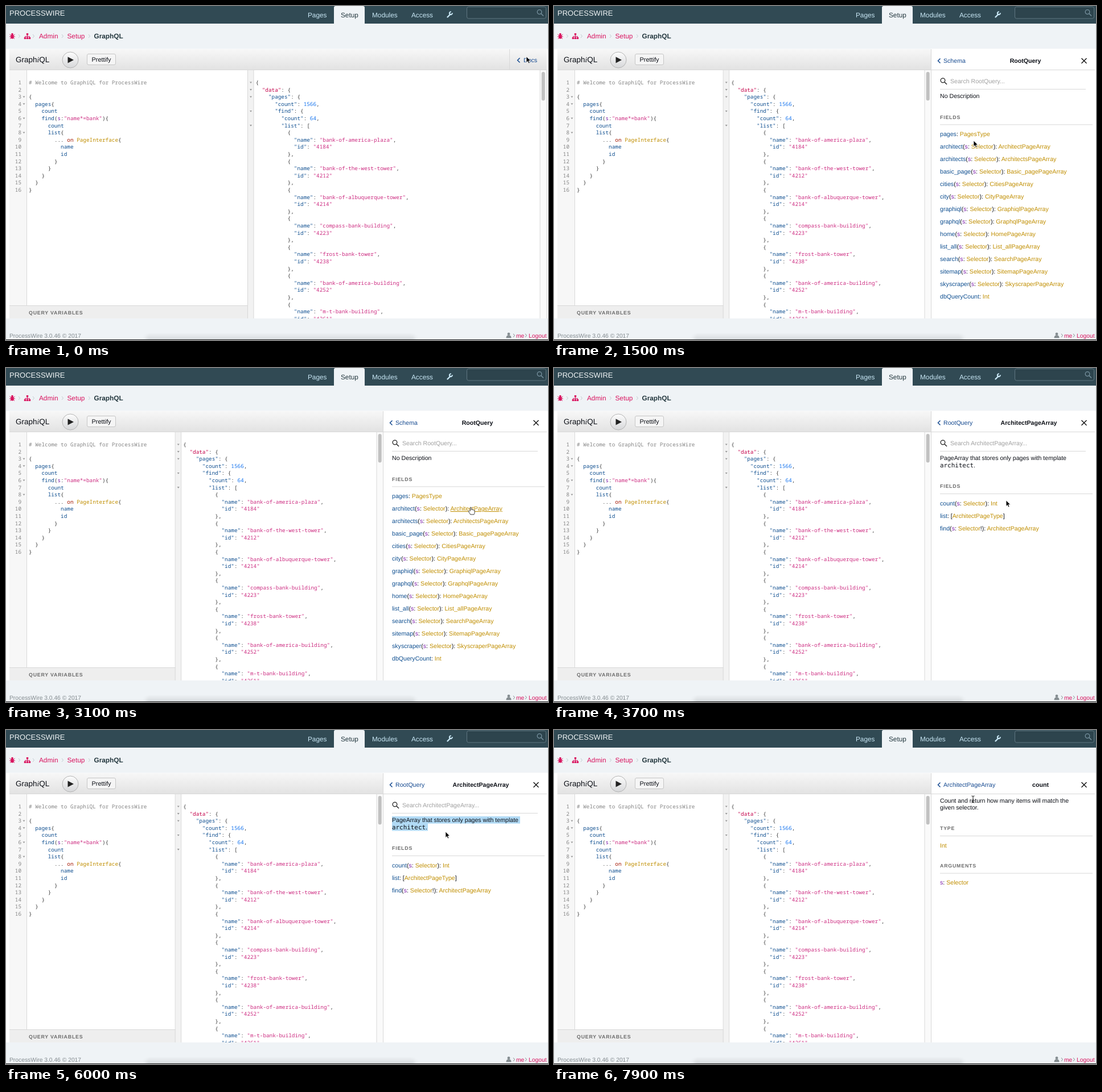
Recreate the animation shown at these times as an HTML page. Size 952x588 px, loop 8000 ms.

```html
<!DOCTYPE html>
<html lang="en">
<head>
<meta charset="utf-8">
<title>GraphiQL docs</title>
<style>
html, body { margin: 0; width: 100%; height: 100%; overflow: hidden; background: #fff; }
svg { display: block; width: 952px; height: 588px; }
text { white-space: pre; font: 10.6px "Liberation Sans", Arial, sans-serif; fill: #0c0f16; text-rendering: geometricPrecision; }
.code { font: 9.35px "Noto Sans Mono", "DejaVu Sans Mono", monospace; }
.nav { font-size: 11.8px; fill: #c9e7f5; }
.crumb { font-size: 11.8px; }
.foot { font-size: 10.3px; fill: #858d91; }
.pink { fill: #d9145f; }
.dark { fill: #22363d; }
.bold { font-weight: bold; }
.caps { font-size: 8.8px; font-weight: bold; letter-spacing: .8px; fill: #6c6c6c; }
.gray, .comment { fill: #868686; }
.hint { fill: #a0a0a0; }
.back { fill: #164a90; }
.code .punct { fill: #3c3c3c; }
.def { fill: #c4024a; }
.key, .field { fill: #0f4f90; }
.string { fill: #cd2e82; }
.keyword { fill: #a51600; }
.type { fill: #c08e00; }
.arg { fill: #7c1caa; }
.number { fill: #1674ee; }
.line { fill: none; stroke: #d8d8d8; }
</style>
</head>
<body>
<svg id="stage" viewBox="0 0 952 588"></svg>
<script>
const LOOP = 8000, ROW = 12.6, FIRST_ROW = 134.5;
const TOKENS = /(?<comment>#.*)|(?<def>"data")|(?<key>"\w+"(?=:))|(?<string>"[^"]*")|(?<keyword>\b(on|query)\b)|(?<type>[A-Z]\w*)|(?<arg>\b\w(?=:))|(?<number>\d+)|(?<field>\w+)|(?<punct>[^\w"#]+)/g;

// Markup helpers; text is placed by its vertical centre.
const label = (x, y, body, cls = "", extra = "") =>
  `<text x="${x}" y="${y + 3.7}" class="${cls}" ${extra}>${body}</text>`;
const rect = (x, y, w, h, fill, extra = "") =>
  `<rect x="${x}" y="${y}" width="${w}" height="${h}" fill="${fill}" ${extra}/>`;
const path = (d, stroke, width = 1, extra = 'fill="none"') =>
  `<path d="${d}" stroke="${stroke}" stroke-width="${width}" ${extra}/>`;
const rule = d => `<path class="line" d="${d}"/>`;
const highlight = source => [...source.matchAll(TOKENS)].map(match => {
  const kind = Object.keys(match.groups).find(name => match.groups[name] !== undefined);
  return `<tspan class="${kind}">${match[0]}</tspan>`;
}).join("");
const codeBlock = (x, lines) => lines.map((line, i) => {
  const indent = line.length - line.trimStart().length;
  return label(x + indent * 5.61, FIRST_ROW + i * ROW - .3, highlight(line.trimStart()), "code");
}).join("");
const folds = (x, rows) => rows.map(row =>
  `<path d="M${x - 2} ${FIRST_ROW + (row - 1) * ROW - 1}h4l-2 2.8z" fill="#999"/>`).join("");
const magnifier = (x, y, color) =>
  `<circle cx="${x - 1}" cy="${y - 1}" r="3.8" fill="none" stroke="${color}" stroke-width="1.3"/>` +
  path(`M${x + 2} ${y + 2}l4 4`, color, 1.5);
const chevron = (x, y, color) => path(`M${x + 4} ${y - 4}l-4 4 4 4`, color, 1.5);

const query = `# Welcome to GraphiQL for ProcessWire

{
  pages{
    count
    find(s:"name*=bank"){
      count
      list{
        ... on PageInterface{
          name
          id
        }
      }
    }
  }
}`.split("\n");

const buildings = [
  ["bank-of-america-plaza", 4184], ["bank-of-the-west-tower", 4212],
  ["bank-of-albuquerque-tower", 4214], ["compass-bank-building", 4223],
  ["frost-bank-tower", 4238], ["bank-of-america-building", 4252], ["m-t-bank-building", 4261]];
const results = ['{', '  "data": {', '    "pages": {', '      "count": 1566,', '      "find": {',
  '        "count": 64,', '        "list": [',
  ...buildings.flatMap(([name, id]) => ['          {', `            "name": "${name}",`,
    `            "id": "${id}"`, '          },'])].slice(0, 34);

const selectorFields = ["architect", "architects", "basic_page", "cities", "city", "graphiql", "graphql",
  "home", "list_all", "search", "sitemap", "skyscraper"].map(name =>
  `${name}(s: Selector): ${name[0].toUpperCase() + name.slice(1)}PageArray`);

const docHeader = (title, center, back) =>
  label(center, 96, title, "bold", 'text-anchor="middle"') +
  (back ? chevron(674.5, 96.5, "#164a90") + label(684, 95.8, back, "back") : "");
const searchBox = name => magnifier(684, 132, "#222") +
  label(696, 132.5, `Search ${name}...`, "hint") + rule("M678 146.5H934");
const section = (title, y, rows) =>
  label(678, y - .5, title, "caps") + rule(`M678 ${y + 13.5}H946`) +
  rows.map((row, i) => label(678, y + 30 + i * 22, highlight(row))).join("");

const docPages = [
  docHeader("Documentation Explorer", 796.5) + searchBox("Schema") +
    label(678, 158.3, "A GraphQL schema provides a root type for each kind") +
    label(678, 171, "of operation.") + section("ROOT TYPES", 208, ["query: RootQuery"]),
  docHeader("RootQuery", 828, "Schema") + searchBox("RootQuery") + label(678, 158.3, "No Description") +
    section("FIELDS", 195.4, ["pages: PagesType", ...selectorFields, "dbQueryCount: Int"]),
  docHeader("ArchitectPageArray", 834, "RootQuery") + searchBox("ArchitectPageArray") +
    '<path id="selection" fill="#b1daf5"/>' +
    label(678, 158.3, "PageArray that stores only pages with template") +
    label(678, 171, '<tspan style="font:10.9px DejaVu Sans Mono,monospace">architect</tspan>.') +
    section("FIELDS", 208, ["count(s: Selector): Int", "list: [ArchitectPageType]",
      "find(s: Selector!): ArchitectPageArray"]),
  docHeader("count", 854.5, "ArchitectPageArray") +
    label(678, 124, "Count and return how many items will match the") +
    label(678, 136.6, "given selector.") + section("TYPE", 173, ["Int"]) +
    section("ARGUMENTS", 238.7, ["s: Selector"])];

const defs = `<defs>
  <linearGradient id="bar" x2="0" y2="1"><stop stop-color="#f7f7f7"/><stop offset="1" stop-color="#e2e2e2"/></linearGradient>
  <linearGradient id="button" x2="0" y2="1"><stop stop-color="#fdfdfd"/><stop offset="1" stop-color="#d6d7d9"/></linearGradient>
  <linearGradient id="shade" x2="0" y2="1"><stop stop-color="#000" stop-opacity="0"/><stop offset="1" stop-color="#000" stop-opacity=".14"/></linearGradient>
  <filter id="soft"><feGaussianBlur stdDeviation="3 1"/></filter>
</defs>`;

const masthead = rect(0, 0, 952, 31, "#314a54") + rect(0, 31, 952, 44.5, "#eff3f6") +
  label(6, 13, "PROCESSWIRE", "", 'style="font-size:13px;fill:#f0f4f5"') +
  '<path d="M576 31V3q0-3 3-3h48q3 0 3 3v28z" fill="#eff3f6"/>' +
  label(530, 16, "Pages", "nav") + label(588, 16, "Setup", "nav dark") +
  label(643, 16, "Modules", "nav") + label(712, 16, "Access", "nav") +
  path("M775.5 19.5l5-5", "#c9e7f5", 2.4, 'fill="none" stroke-linecap="round"') +
  path("M783.8 12.2a2.5 2.5 0 1 1-2-2", "#c9e7f5", 2) +
  rect(809.5, 1.5, 139, 20.5, "#2d444d", 'rx="3" stroke="#5f7680"') + magnifier(938, 11.5, "#7893a0");

const breadcrumb =
  '<ellipse cx="11" cy="54" rx="2.8" ry="3.8" class="pink"/><circle cx="11" cy="49.6" r="1.8" class="pink"/>' +
  path("M6.5 50l2.5 2M15.5 50l-2.5 2M6 54h10M7 58l2-2M15 58l-2-2", "#d9145f") +
  path("M37.5 50v6M33.5 56v-2.5h8V56", "#d9145f") +
  [[35.8, 48], [31.8, 55], [35.8, 55], [39.8, 55]].map(([x, y]) => rect(x, y, 3.4, 3.2, "#d9145f")).join("") +
  [22, 47, 98, 145].map(x => path(`M${x} 50l2.5 3-2.5 3`, "#c3cbd0")).join("") +
  label(58, 53, "Admin", "crumb pink") + label(107.5, 53, "Setup", "crumb pink") +
  label(154.5, 53, "GraphQL", "crumb dark bold");

const toolbar = rect(6, 76, 944, 37, "url(#bar)") + rule("M6 112.5H950M884.5 76V112") +
  label(17, 95.5, 'Graph<tspan style="font-family:Liberation Serif,serif;font-style:italic">i</tspan>QL', "", 'style="font-size:13.5px"') +
  '<circle cx="113" cy="95" r="14" fill="url(#button)" stroke="#b4b4b4"/><path d="M108.5 89.5v11l10.5-5.5z" fill="#222"/>' +
  rect(142.5, 84.5, 50, 19, "#f5f5f5", 'rx="2.5" stroke="#c6c6c6"') +
  label(150.5, 94, "Prettify", "", 'style="font-size:10.9px"') +
  chevron(898.5, 95.5, "#164a90") + label(909, 95, "Docs", "back");

const editor = rect(6, 113, 31, 415, "#f7f7f7") + rule("M36.5 113V528") +
  query.map((_, i) => label(27, FIRST_ROW + i * ROW - .3, i + 1, "code gray", 'text-anchor="end"')).join("") +
  folds(31.5, [3, 4, 6, 8]) + codeBlock(40, query) +
  rect(6, 528, 430, 22, "#eee") + rule("M6 527.5H425") + label(40, 539.5, "QUERY VARIABLES", "caps");

const resultPane = rect(425, 113, 527, 437, "#fff") + rect(425, 113, 10, 437, "#f2f2f2") +
  rule("M424.5 113V550M435 113V550") + folds(430, [1, 2, 3, 5, 7]) + codeBlock(438.5, results);
const scrollbar = rect(938, 113, 11.5, 437, "#fafafa") + rule("M938 113V550M949.5 113V550") +
  rect(940.7, 116, 6, 50.5, "#c1c1c1", 'rx="3"');

const docPanel = rect(662, 75.5, 288, 474.5, "#fff") + rule("M662.5 76V550M662 112.5H950") +
  path("M926.5 92l9 9M935.5 92l-9 9", "#111", 1.4) +
  docPages.map(page => `<g class="page">${page}</g>`).join("");

const footer = rect(0, 550, 952, 38, "#eff3f6") +
  rect(246, 575, 472, 18, "url(#shade)", 'rx="8" filter="url(#soft)"') + rect(0, 587, 952, 1, "#222") +
  label(6, 580, "ProcessWire 3.0.46 © 2017", "foot") +
  '<circle cx="883" cy="577.5" r="2.4" fill="#858d91"/><path d="M878.5 584.5q0-5 4.5-5t4.5 5z" fill="#858d91"/>' +
  path("M891 577l2.5 3-2.5 3M912 577l2.5 3-2.5 3", "#858d91") +
  label(896, 580, "me", "foot pink") + label(918, 580, "Logout", "foot pink");

const pointer = `<g id="pointer">
  <circle id="ring" r="12.8" fill="#fff" fill-opacity=".25" stroke="#111" stroke-width="1.6"/>
  <path data-shape="arrow" d="M0 0V10.5L2.4 8.3 4 12 5.8 11.2 4.2 7.6H7.5Z" stroke="#fff" stroke-width=".7"/>
  <path data-shape="hand" transform="scale(.92)" d="M-1.2 6V.3c0-1.6 2.4-1.6 2.4 0V4c.6-1 2-.8 2.2.2.7-.7 2-.4 2.1.6.8-.5 1.7 0 1.7 1V9c0 2-1 3-1.2 4H-1c-.5-2-3-4-3.5-6-.2-1.2 1.4-1.6 2.2-.3z" fill="#fff" stroke="#111" stroke-width=".9"/>
  <path data-shape="beam" d="M-2.5-6Q0-6 0-4.5 0-6 2.5-6M0-4.5V4.5M-2.5 6Q0 6 0 4.5 0 6 2.5 6" fill="none" stroke="#111"/>
</g>`;

const stage = document.getElementById("stage");
stage.innerHTML = defs + masthead + breadcrumb + toolbar + editor +
  `<g id="results">${resultPane}</g><g id="scrollbar">${scrollbar}</g><g id="docs">${docPanel}</g>` + footer + pointer;

const pages = [...stage.querySelectorAll(".page")];
const shapes = [...stage.querySelectorAll("[data-shape]")];
const findLink = (page, content, kind) => [...[...pages[page].querySelectorAll("text")]
  .find(node => node.textContent.startsWith(content)).querySelectorAll("." + kind)].pop();
const links = [findLink(0, "query:", "type"), findLink(1, "architect(", "type"), findLink(2, "count(", "field")];
const [resultsEl, scrollEl, docsEl, pointerEl, ringEl, selectionEl] =
  ["results", "scrollbar", "docs", "pointer", "ring", "selection"].map(id => document.getElementById(id));

// Time, x, y and pointer shape until the next stop.
const stops = [
  [0, 914, 89, "arrow"], [100, 915, 92, "hand"], [300, 915, 92, "arrow"], [550, 915, 92, "arrow"],
  [900, 752, 213, "arrow"], [1100, 738, 235, "hand"], [1200, 737, 237, "hand"], [1500, 737, 237, "arrow"],
  [1900, 737, 237, "arrow"], [2600, 806, 257, "arrow"], [2850, 806, 257, "arrow"], [2950, 816.5, 246, "hand"],
  [3200, 816.5, 246, "arrow"], [3500, 816.5, 246, "arrow"], [4250, 690, 172, "beam"], [4400, 679, 159, "beam"],
  [4600, 680, 160, "beam"], [4800, 700, 164, "beam"], [5000, 728, 172, "beam"], [5200, 772, 179, "beam"],
  [5400, 772, 179, "arrow"], [5600, 772, 179, "arrow"], [6000, 772, 179, "arrow"], [6300, 694, 234, "hand"],
  [6400, 690, 238, "hand"], [7100, 690, 238, "arrow"], [7300, 690, 238, "arrow"], [7800, 734, 127, "beam"],
  [7900, 736, 122, "beam"], [LOOP, 736, 122, "beam"]];
const presses = [[200, 300], [1400, 1500], [4600, 5400], [7000, 7100]];
const pageStarts = [300, 1500, 3200, 7100];

function pointerAt(t) {
  const i = stops.findIndex(stop => stop[0] > t) - 1;
  const [t0, x0, y0, shape] = stops[i], [t1, x1, y1] = stops[i + 1];
  const u = (t - t0) / (t1 - t0), eased = u * u * (3 - 2 * u);
  return { x: x0 + (x1 - x0) * eased, y: y0 + (y1 - y0) * eased, shape };
}

function selectionPath(t) {
  if (t < 4600) return "";
  const { x, y } = pointerAt(Math.min(t, 5200));
  if (y < 166) return `M678 152H${678 + (x - 678) / 2}V164.8H678z`;
  return `M678 152H903V164.8H${Math.min(x, 741)}V177.5H678z`;
}

const show = (node, visible) => node.setAttribute("display", visible ? "inline" : "none");

function draw() {
  const t = performance.now() % LOOP;
  const page = pageStarts.filter(start => t >= start).length - 1;
  const open = page >= 0;
  const { x, y, shape } = pointerAt(t);
  resultsEl.setAttribute("transform", `translate(${open ? -127.3 : 0})`);
  scrollEl.setAttribute("transform", `translate(${open ? -287 : 0})`);
  show(docsEl, open);
  pages.forEach((node, i) => show(node, i === page));
  links.forEach((node, i) => node.style.textDecoration = i === page && shape === "hand" ? "underline" : "none");
  selectionEl.setAttribute("d", selectionPath(t));
  pointerEl.setAttribute("transform", `translate(${x} ${y})`);
  shapes.forEach(node => show(node, node.dataset.shape === shape));
  show(ringEl, presses.some(([from, to]) => t >= from && t < to));
  requestAnimationFrame(draw);
}
draw();
</script>
</body>
</html>
```
